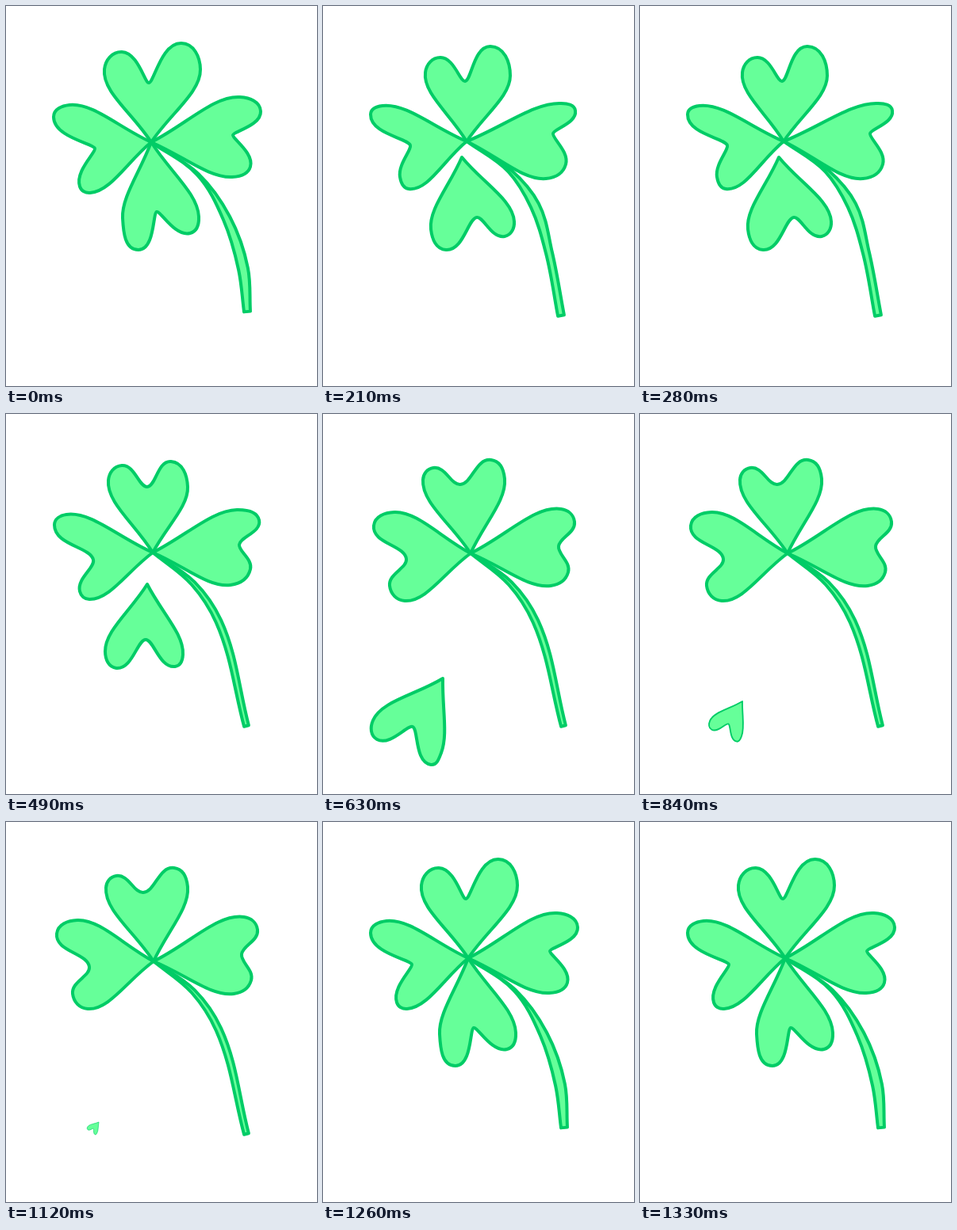
Write an HTML page with a canvas that moves like this. It is 392 px wide and 480 px high and loops after 1540 ms.

```html
<!DOCTYPE html>
<html lang="en">
<head>
<meta charset="utf-8">
<title>Clover</title>
<style>
  html, body { margin: 0; width: 100%; height: 100%; overflow: hidden; background: #fff; }
  canvas { display: block; }
</style>
</head>
<body>
<canvas id="stage" width="392" height="480"></canvas>
<script>
const ctx = document.getElementById('stage').getContext('2d');
const LOOP = 1540, HOLD = 210;

const parse = text => text.split(' ').map(s => s.split(',').map(Number));

function unit(a, b) {
  const x = b[0] - a[0], y = b[1] - a[1], d = Math.hypot(x, y) || 1;
  return [x / d, y / d];
}

// Direction halfway between the chords before and after point i.
function tangent(p, i) {
  const a = unit(p[i - 1] || p[i], p[i]), b = unit(p[i], p[i + 1] || p[i]);
  return unit([0, 0], [a[0] + b[0], a[1] + b[1]]);
}

// Smooth open curve; reach(i) gives both handle lengths as parts of chord i.
function curve(path, p, reach) {
  for (let i = 0; i < p.length - 1; i++) {
    const [x0, y0] = p[i], [x1, y1] = p[i + 1];
    const d = Math.hypot(x1 - x0, y1 - y0), [out, back] = reach(i).map(k => k * d);
    const t0 = tangent(p, i), t1 = tangent(p, i + 1);
    path.bezierCurveTo(x0 + t0[0] * out, y0 + t0[1] * out,
                       x1 - t1[0] * back, y1 - t1[1] * back, x1, y1);
  }
}

// Heart from its tip: side, lobe, notch, lobe, side. "round" softens the notch.
function leaf(tip, keys, round) {
  const p = [tip, ...parse(keys), tip], path = new Path2D();
  const handles = [0.4, 0.39, 0.39, round, 0.39, 0.39, 0.4], side = 0.26;
  path.moveTo(...tip);
  curve(path, p, i => [i === 5 ? side : handles[i], i === 0 ? side : handles[i + 1]]);
  path.closePath();
  return path;
}

// Spine points "x,y,half width" turned into an outline.
function stem(tip, keys) {
  const spine = [[...tip, 0], ...parse(keys)], path = new Path2D();
  const edge = sign => spine.map(([x, y, w], i) => {
    const [tx, ty] = tangent(spine, i);
    return [x + ty * w * sign, y - tx * w * sign];
  });
  const outer = edge(1), inner = edge(-1).reverse(), even = () => [0.35, 0.35];
  path.moveTo(...tip);
  curve(path, outer, even);
  path.lineTo(...inner[0]);
  curve(path, inner, even);
  path.closePath();
  return path;
}

const clover = (tip, round, spine, ...leaves) =>
  [stem(tip, spine), ...leaves.map(keys => leaf(tip, keys, round))];

const whole = clover([183, 172], 0.1,
  '242,213,1 278,268,4.5 299,332,6 304,386,4',
  '124,80 146,58 180,97 221,47 245,80',
  '80,125 60,140 112,180 93,228 106,236',
  '295,115 321,133 286,163 308,203 285,216',
  '147,268 167,308 190,260 232,287 243,266');

const parting = clover([181, 171], 0.15,
  '235,208,2 267,252,5.5 285,312,4 300,391,4',
  '129,84 148,65 179,95 211,51 236,88',
  '75,126 60,137 110,176 97,216 108,231',
  '300,123 318,132 290,161 306,200 281,218');
const dropping = leaf([175, 191], '136,282 155,308 194,267 229,291 241,272', 0.2);

const bend = '236,214,2.5 268,262,3.5 303,394,3';
const loose = clover([185, 175], 0.25, bend,
  '129,84 146,65 178,92 208,60 229,92',
  '76,127 61,140 110,184 93,224 105,234',
  '291,121 319,134 294,165 308,196 283,216');
const sinking = leaf([178, 215], '125,300 139,321 176,285 213,319 223,304', 0.2);

const three = clover([186, 176], 0.3, bend,
  '126,83 139,68 173,89 212,58 229,82',
  '90,124 64,141 105,183 84,217 103,236',
  '300,120 317,136 297,167 309,200 287,217');
// Drawn with its tip at 0,0 so it can shrink.
const falling = leaf([0, 0], '-88,53 -83,77 -38,61 -15,109 -2,94', 0.15);

function draw(path, x = 0, y = 0, scale = 1, angle = 0) {
  ctx.save();
  ctx.translate(x, y);
  ctx.rotate(angle);
  ctx.scale(scale, scale);
  ctx.fill(path);
  ctx.stroke(path);
  ctx.restore();
}

const drawAll = parts => parts.forEach(part => draw(part));

const poses = [
  () => drawAll(whole),
  () => drawAll([...parting, dropping]),
  () => drawAll([...loose, sinking]),
  () => { drawAll(three); draw(falling, 151, 334); },
  () => { drawAll(three); draw(falling, 129, 363, 0.465); },
  () => { drawAll(three); draw(falling, 117, 379, 0.15, 0.14); }
];

function frame(now) {
  const step = Math.floor(now % LOOP / HOLD);
  ctx.fillStyle = '#fff';
  ctx.fillRect(0, 0, 392, 480);
  ctx.fillStyle = '#66ff99';
  ctx.strokeStyle = '#00cc66';
  ctx.lineWidth = 4;
  ctx.lineJoin = 'round';
  poses[step % poses.length]();
  requestAnimationFrame(frame);
}
frame(0);
</script>
</body>
</html>
```
